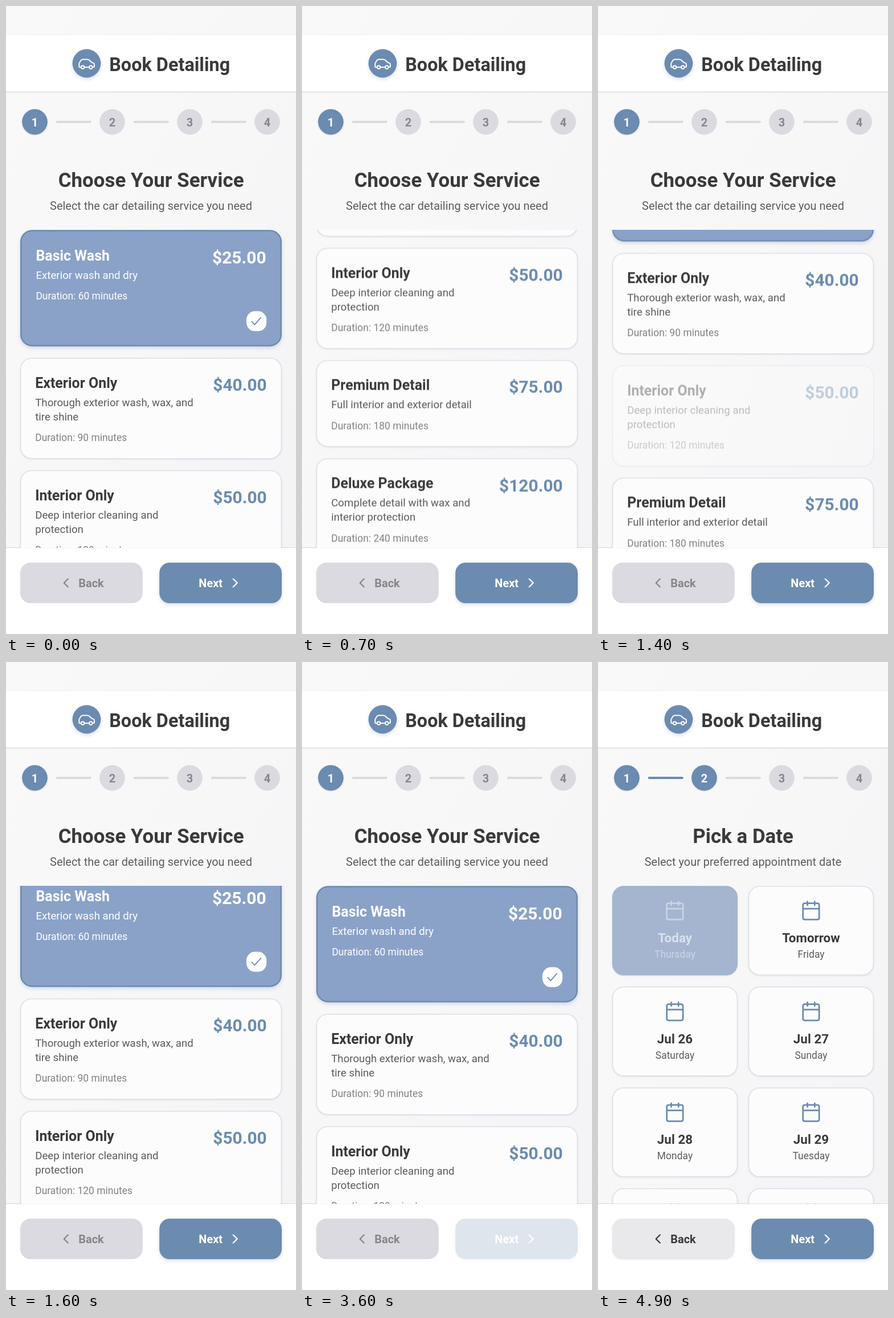
These frames come from a looping animation (509 px wide and 1100 px high, 5 s). An HTML page:

```html
<!DOCTYPE html>
<html lang="en">
<head>
<meta charset="utf-8">
<title>Book Detailing</title>
<style>
  html, body { margin: 0; width: 100%; height: 100%; overflow: hidden; background: #f7f7f8; }
  svg { display: block; width: 509px; height: 1100px; font-family: Roboto, sans-serif; }
  text { fill: #3a3a3c; }
  .b { font-weight: 700; }
  .mid { text-anchor: middle; }
  .end { text-anchor: end; }
  .h1 { font-size: 32.4px; }
  .h2 { font-size: 34.9px; }
  .sub { font-size: 19.96px; fill: #5c5c60; }
  .name { font-size: 24.95px; }
  .price { font-size: 29.94px; fill: #6b8bb0; }
  .desc { font-size: 18.71px; fill: #5b5b5f; }
  .note { font-size: 17.47px; fill: #828287; }
  .day { font-size: 22.45px; }
  .week { font-size: 17.47px; fill: #5c5c60; }
  .label { font-size: 19.96px; }
  .line { fill: none; stroke-linecap: round; stroke-linejoin: round; }
  .card { fill: #fcfcfd; stroke: #dcdce4; stroke-width: 1.25; }
  .soft { filter: drop-shadow(0 1.5px 1.5px rgba(60, 70, 110, .12)); }
  .lift { filter: drop-shadow(0 3px 3px rgba(70, 95, 140, .2)); }
  .chosen text { fill: #fff; }
  .chosen .card { fill: #8aa2c8; stroke: #6b8bb0; stroke-width: 2.5; }
  .picked .card { fill: #a5b5d0; stroke: #9fb3cf; }
  .picked .day { fill: #dae0ec; }
  .picked .week { fill: #ccd5e5; }

  .a { animation: 5s step-end infinite; }
  .list { animation-name: scroll; }
  .held { animation-name: held; }
  .press { animation-name: press; }
  .release { animation-name: release; }
  .tap { animation-name: tap; }
  .one { animation-name: one; }
  .two { animation-name: two; }
  .before { animation-name: before; }
  .after { animation-name: after; }

  @keyframes scroll {
    0% { transform: translateY(0); }
    8% { transform: translateY(-18px); }
    10% { transform: translateY(-130px); }
    12% { transform: translateY(-290px); }
    14% { transform: translateY(-389.5px); }
    16% { transform: translateY(-424px); }
    18% { transform: translateY(-435px); }
    26% { transform: translateY(-365px); }
    28% { transform: translateY(-183.7px); }
    30% { transform: translateY(-76px); }
    32% { transform: translateY(-27px); }
    34% { transform: translateY(-7px); }
    36%, 100% { transform: translateY(0); }
  }
  @keyframes held {
    0% { opacity: 1; }
    20% { opacity: .6; }
    22% { opacity: .25; }
    28% { opacity: .38; }
    30% { opacity: .85; }
    32%, 100% { opacity: 1; }
  }
  @keyframes press { 0% { opacity: 1; } 72%, 100% { opacity: .22; } }
  @keyframes release {
    0% { opacity: .2; }
    76% { opacity: .45; }
    78% { opacity: .85; }
    80%, 100% { opacity: 1; }
  }
  @keyframes tap { 0% { opacity: 1; } 96%, 100% { opacity: .35; } }
  @keyframes one { 0% { visibility: visible; } 76%, 100% { visibility: hidden; } }
  @keyframes two { 0% { visibility: hidden; } 76%, 100% { visibility: visible; } }
  @keyframes before { 0% { visibility: hidden; } 76% { visibility: visible; } 98%, 100% { visibility: hidden; } }
  @keyframes after { 0% { visibility: hidden; } 98%, 100% { visibility: visible; } }
</style>
</head>
<body>
<svg id="stage" viewBox="0 0 509 1100">
  <defs>
    <linearGradient id="bg" x1="0" y1="0" x2="1" y2="1">
      <stop offset="0" stop-color="#f9f9f9"/>
      <stop offset=".5" stop-color="#f7f7f8"/>
      <stop offset="1" stop-color="#f3f2f5"/>
    </linearGradient>
    <clipPath id="view"><rect y="392" width="509" height="556.5"/></clipPath>
  </defs>
  <rect width="509" height="1100" fill="url(#bg)"/>
  <rect y="51" width="509" height="100" fill="#fff" style="filter: drop-shadow(0 0 1.5px rgba(0,0,0,.06))"/>
  <rect y="149.8" width="509" height="1.4" fill="#dadadd"/>
  <circle class="lift" cx="141.5" cy="100.5" r="24.9" fill="#6b8bb0"/>
  <g class="line" stroke="#fff" stroke-width="2">
    <path d="M131.6 107.2H130q-1.6 0-1.6-1.8v-3.6q0-2 1-3.2l2.2-3.6q1-1.6 3-1.6h8q2 0 3.6 1.4l4 3.9 2.8.9q2 .7 2 2.8v3q0 1.8-1.8 1.8h-1.1M138 107.2h7.6"/>
    <circle cx="134.8" cy="107.2" r="2.7"/>
    <circle cx="148.9" cy="107.2" r="2.7"/>
  </g>
  <text class="b h1" x="181.2" y="113.6">Book Detailing</text>
  <rect y="948" width="509" height="152" fill="#fff"/>
  <rect y="948" width="509" height="1.4" fill="#dedee1"/>
</svg>
<script>
  const BLUE = '#6b8bb0', GREY = '#dadae0', DIM = '#86868b', DARK = '#3a3a3c';

  const text = (cls, x, y, str, fill) =>
    `<text class="${cls}" x="${x}" y="${y}"${fill ? ` style="fill:${fill}"` : ''}>${str}</text>`;

  const box = (x, y, w, h, r, attrs) =>
    `<rect x="${x}" y="${y}" width="${w}" height="${h}" rx="${r}" ${attrs}/>`;

  const group = (cls, inner) => `<g class="${cls}">${inner}</g>`;

  function steps(done) {
    let out = '';
    for (let i = 0; i < 4; i++) {
      const x = 50.5 + i * 136, on = i < done;
      out += `<circle cx="${x}" cy="203" r="22.4" fill="${on ? BLUE : GREY}" ${on ? 'class="soft"' : ''}/>`;
      out += text('b mid label', x, 210.6, i + 1, on ? '#fff' : DIM);
      if (i < 3) out += box(x + 37.3, 201.1, 62, 3.8, 1.9, `fill="${i < done - 1 ? BLUE : GREY}"`);
    }
    return out;
  }

  const heading = (title, sub) =>
    text('b h2 mid', 254.6, 316.8, title) + text('sub mid', 254.5, 357.1, sub);

  // dir: -1 for the left button, 1 for the right one
  function button(dir, fill, ink, shadow) {
    const back = dir < 0, x = back ? 25 : 269.2;
    const tip = back ? 101.8 : 405.8;
    return box(x, 975, 214.8, 71, 18, `fill="${fill}" ${shadow ? `class="${shadow}"` : ''}`) +
      text('b label', back ? 127.3 : 338.3, 1018.1, back ? 'Back' : 'Next', ink) +
      `<path class="line" stroke="${ink}" stroke-width="2.3" d="M${tip - dir * 7} 1003.5L${tip} 1010.5 ${tip - dir * 7} 1017.5"/>`;
  }

  function service([y, name, price, lines, mins, cls = '']) {
    const on = cls === 'chosen', pad = on ? 27.4 : 26.2, inset = on ? 1.25 : .6;
    const h = on ? 204 : 151.7 + (lines.length - 1) * 25, x = 25 + pad, top = y + pad;
    let out = box(25 + inset, y + inset, 459 - inset * 2, h - inset * 2, 19.5, `class="card ${on ? 'lift' : 'soft'}"`);
    out += text('b name', x, top + 26.2, name);
    out += text('b price end', 484 - pad, top + 31.3, price);
    lines.forEach((s, i) => out += text('desc', x, top + 58.2 + i * 24.95, s));
    out += text('note', x, top + 69.8 + lines.length * 24.95, `Duration: ${mins} minutes`);
    if (on) {
      out += box(422, y + 142.4, 35.3, 35, 15, 'fill="#fff"');
      out += `<path class="line" stroke="${BLUE}" stroke-width="1.8" d="M431.6 ${y + 160.6}l4.7 5.4 11-12.4"/>`;
    }
    return group(cls, out);
  }

  function date(x, y, day, week, ink = BLUE) {
    const c = x + 110;
    return box(x + .6, y + .6, 218.8, 155.4, 19.5, 'class="card soft"') +
      `<path class="line" stroke="${ink}" stroke-width="1.75" transform="translate(${c - 19} ${y + 24.2}) scale(1.58)"
        d="M5 4h14q2 0 2 2v14q0 2-2 2H5q-2 0-2-2V6q0-2 2-2zM16 2v4M8 2v4M3 10h18"/>` +
      text('b day mid', c, y + 98.9, day) + text('week mid', c, y + 126, week);
  }

  const services = [
    [392.2, 'Basic Wash', '$25.00', ['Exterior wash and dry'], 60, 'chosen'],
    [616.4, 'Exterior Only', '$40.00', ['Thorough exterior wash, wax, and', 'tire shine'], 90],
    [813.2, 'Interior Only', '$50.00', ['Deep interior cleaning and', 'protection'], 120, 'a held'],
    [1009.9, 'Premium Detail', '$75.00', ['Full interior and exterior detail'], 180],
    [1182, 'Deluxe Package', '$120.00', ['Complete detail with wax and', 'interior protection'], 240]
  ];
  const days = [['Today', 'Thursday'], ['Tomorrow', 'Friday'], ['Jul 26', 'Saturday'], ['Jul 27', 'Sunday'],
    ['Jul 28', 'Monday'], ['Jul 29', 'Tuesday'], ['Jul 30', 'Wednesday'], ['Jul 31', 'Thursday']];

  const dates = days.map(([day, week], i) => {
    const card = ink => date(i % 2 ? 264 : 25, 392.2 + (i >> 1) * 176.6, day, week, ink);
    return i ? card() : group('a before', group('a tap', card())) + group('a after picked', card('#c9d3e3'));
  }).join('');

  const view = inner => `<g clip-path="url(#view)">${inner}</g>`;

  document.getElementById('stage').insertAdjacentHTML('beforeend',
    group('a one',
      steps(1) + heading('Choose Your Service', 'Select the car detailing service you need') +
      view(group('a list', services.map(service).join(''))) +
      button(-1, GREY, DIM) + group('a press', button(1, BLUE, '#fff', 'lift'))) +
    group('a two',
      steps(2) + heading('Pick a Date', 'Select your preferred appointment date') +
      view(dates) +
      button(-1, '#e9e9eb', DARK, 'soft') +
      group('a before', group('a release', button(1, GREY, DIM))) +
      group('a after', button(1, BLUE, '#fff', 'lift'))));
</script>
</body>
</html>
```
